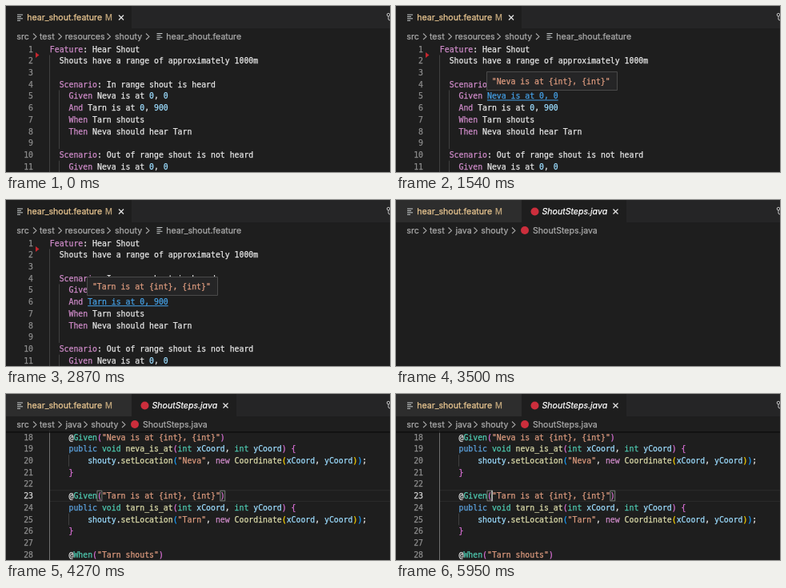
Recreate the animation shown at these times as an HTML page with a canvas. Size 480 px wide and 208 px high, loop 6020 ms.

```html
<!DOCTYPE html>
<html lang="en">
<head>
<meta charset="utf-8">
<title>Step definition lookup</title>
<style>
html, body { margin: 0; width: 100%; height: 100%; overflow: hidden; background: #1e1e1e; }
canvas { display: block; width: 480px; height: 208px; }
</style>
</head>
<body>
<canvas></canvas>
<script>
const canvas = document.querySelector('canvas');
const ctx = canvas.getContext('2d');
const scale = window.devicePixelRatio || 1;
canvas.width = 480 * scale;
canvas.height = 208 * scale;

const LOOP = 6020, CODE_X = 54.8, TOP = 46.7, ROW = 14.7;
const MONO = '9.83px "DejaVu Sans Mono", monospace';
const SANS = '10.6px Inter, sans-serif';
const BG = '#1e1e1e', TEXT = '#e8e8e8', MUTED = '#a9a9a9', GOLD = '#e8c590', GUTTER = '#8c8c8c';
const PINK = '#cf8bc9', BLUE = '#5ca2de', SKY = '#9cdcfe', TEAL = '#4ec9b0',
  SAND = '#dcdcaa', CLAY = '#dc9a7e', LINK = '#45a0e6', RED = '#cc2e3c';
const BRACKETS = ['#ffd700', '#da70d6', '#179fff'];

const feature = `Feature: Hear Shout
  Shouts have a range of approximately 1000m

  Scenario: In range shout is heard
    Given Neva is at 0, 0
    And Tarn is at 0, 900
    When Tarn shouts
    Then Neva should hear Tarn

  Scenario: Out of range shout is not heard
    Given Neva is at 0, 0`.split('\n');

const step = (name) => `    @Given("${name} is at {int}, {int}")
    public void ${name.toLowerCase()}_is_at(int xCoord, int yCoord) {
        shouty.setLocation("${name}", new Coordinate(xCoord, yCoord));
    }
`;
const java = `${step('Neva')}\n${step('Tarn')}\n    @When("Tarn shouts")`.split('\n');

// Each capture group takes the colour at the same position; brackets go by depth.
const featureRules = {
  pattern: /\b(Feature|Scenario|Given|And|When|Then)\b|\b(\d+)\b/g,
  colors: [PINK, SKY]
};
const javaRules = {
  pattern: /(".*?")|((?<=@)\w+|\b(?:void|int)\b)|(\bpublic\b)|(\bnew\b)|(\w+(?=\())|(\b(?:xCoord|yCoord|shouty)\b)|[(){}]/g,
  colors: [CLAY, TEAL, BLUE, PINK, SAND, SKY]
};

const givenLink = { row: 4, col: 10, text: 'Neva is at 0, 0', tip: '"Neva is at {int}, {int}"', y: 82.5 };
const andLink = { row: 5, col: 8, text: 'Tarn is at 0, 900', tip: '"Tarn is at {int}, {int}"', y: 96.5 };
const hovers = [
  { from: 490, to: 1190, link: andLink },
  { from: 1190, to: 1890, link: givenLink, tip: 1400 },
  { from: 1890, to: 3290, link: andLink, tip: 2310 }
];
const OPEN = 3290, LOADED = 3710;

ctx.font = MONO;
const CHAR = ctx.measureText('0').width;
const colX = (col) => CODE_X + col * CHAR;
const rowY = (row) => TOP + row * ROW;

function rect(x, y, w, h, color) {
  ctx.fillStyle = color;
  ctx.fillRect(x, y, w, h);
}

function frame(x, y, w, h, color) {
  ctx.strokeStyle = color;
  ctx.lineWidth = 1;
  ctx.strokeRect(x, y, w, h);
}

// The thin outline gives the glyphs a slightly heavier weight.
function label(text, x, y, color, font = SANS) {
  ctx.font = font;
  ctx.fillStyle = ctx.strokeStyle = color;
  ctx.lineWidth = 0.25;
  ctx.lineJoin = 'round';
  ctx.fillText(text, x, y);
  ctx.strokeText(text, x, y);
}

function stroke(points, color, width = 1) {
  ctx.strokeStyle = color;
  ctx.lineWidth = width;
  ctx.beginPath();
  points.forEach(([x, y]) => ctx.lineTo(x, y));
  ctx.stroke();
}

function dot(x, y, r, color) {
  ctx.fillStyle = color;
  ctx.beginPath();
  ctx.arc(x, y, r, 0, 2 * Math.PI);
  ctx.fill();
}

function fileIcon(x, y) {
  [7, 5, 7, 4].forEach((w, i) => rect(x, y - 4 + i * 2.4, w, 1, '#c8cccd'));
}

function closeIcon(x, y) {
  stroke([[x - 3, y - 3], [x + 3, y + 3]], '#e4e4e4', 1.2);
  stroke([[x + 3, y - 3], [x - 3, y + 3]], '#e4e4e4', 1.2);
}

function crumbs(items) {
  items.forEach(([text, x, chevron]) => {
    label(text, x, 41.6, MUTED);
    if (chevron) stroke([[chevron - 2, 34.5], [chevron + 2, 38.3], [chevron - 2, 42]], MUTED, 1.1);
  });
}

function header(javaOpen) {
  rect(0, 0, 480, 28, '#252526');
  rect(0, 0, 157, 28, javaOpen ? '#2d2d2d' : BG);
  fileIcon(14, 14.5);
  label('hear_shout.feature', 26.2, 18.2, GOLD);
  label('M', 124, 18.2, '#c4a87d', '9.8px Inter, sans-serif');
  if (javaOpen) {
    rect(157, 0, 131, 28, BG);
    dot(173.5, 14.5, 5, RED);
    label('ShoutSteps.java', 182.5, 18.2, '#ffffff', 'italic ' + SANS);
    closeIcon(274.5, 14.5);
    crumbs([['src', 13.3, 36], ['test', 42, 67.5], ['java', 74.5, 99.5], ['shouty', 106.3, 147], ['ShoutSteps.java', 171]]);
    dot(161, 38, 5, RED);
  } else {
    closeIcon(144, 14.5);
    crumbs([['src', 13.3, 36], ['test', 42, 67.5], ['resources', 73.8, 128.5], ['shouty', 136, 177], ['hear_shout.feature', 200.2]]);
    fileIcon(188.5, 38);
  }
  ctx.strokeStyle = '#c5c5c5';
  ctx.lineWidth = 1;
  ctx.beginPath();
  ctx.arc(478, 11, 1.8, 0, 2 * Math.PI);
  ctx.stroke();
  stroke([[478, 13], [478, 17], [480, 18]], '#c5c5c5');
}

function code(lines, rules, first, activeRow) {
  let depth = 1;

  function tokenColor(match) {
    const group = match.slice(1).findIndex(Boolean);
    if (group >= 0) return rules.colors[group];
    const level = '({'.includes(match[0]) ? depth++ : --depth;
    return BRACKETS[level % BRACKETS.length];
  }

  lines.forEach((text, row) => {
    const y = rowY(row) + 10.9;
    const number = String(first + row);
    label(number, 34 - number.length * CHAR, y, row === activeRow ? '#d0d0d0' : GUTTER, MONO);
    let end = 0;
    for (const match of text.matchAll(rules.pattern)) {
      label(text.slice(end, match.index), colX(end), y, TEXT, MONO);
      label(match[0], colX(match.index), y, tokenColor(match), MONO);
      end = match.index + match[0].length;
    }
    label(text.slice(end), colX(end), y, TEXT, MONO);
  });
}

function guide(col, fromRow, toRow, color = '#404040') {
  rect(Math.floor(colX(col)), rowY(fromRow), 1, (toRow - fromRow) * ROW, color);
}

function hover({ link, tip }, t) {
  const x = colX(link.col), y = rowY(link.row), w = link.text.length * CHAR;
  rect(x, y, w, ROW, BG);
  label(link.text, x, y + 10.9, LINK, MONO);
  rect(x, y + 12, w, 1, LINK);
  if (!tip || t < tip) return;
  ctx.globalAlpha = Math.min(1, (t - tip + 35) / 100);
  const left = Math.round(x) - 0.5;
  rect(left, link.y, 163, 23, '#252526');
  frame(left, link.y, 163, 23, '#4a4a4a');
  label(link.tip, x + 5.8, link.y + 15, CLAY, MONO);
  ctx.globalAlpha = 1;
}

function featureView(t) {
  guide(0, 1, 11);
  guide(2, 4, 9);
  guide(2, 10, 11);
  code(feature, featureRules, 1);
  ctx.fillStyle = '#c4262e';
  ctx.beginPath();
  ctx.moveTo(37, 58);
  ctx.lineTo(41.5, 61.5);
  ctx.lineTo(37, 65);
  ctx.fill();
  const active = hovers.find(({ from, to }) => t >= from && t < to);
  if (active) hover(active, t);
}

function javaView(t) {
  const row = 5, y = rowY(row);
  rect(CODE_X, y, 425, 1, '#2c2c2c');
  rect(CODE_X, y + ROW - 1, 425, 1, '#2c2c2c');
  guide(0, 0, 11, '#707070');
  guide(4, 2, 3);
  guide(4, 7, 8);
  [java[row].indexOf('('), java[row].lastIndexOf(')')].forEach((col) => {
    rect(colX(col), y + 1, CHAR, ROW - 2, '#1b261b');
    frame(colX(col), y + 1, CHAR, ROW - 2, '#7c7c7c');
  });
  code(java, javaRules, 18, row);
  rect(0, 47, 480, 1.5, '#0e0e0e');
  if (Math.floor((t - LOADED) / 500) % 2 === 0) rect(colX(11) - 0.5, y + 0.5, 1.4, ROW - 1, '#c8c8c6');
}

function draw(now) {
  const t = now % LOOP;
  ctx.setTransform(scale, 0, 0, scale, 0, 0);
  rect(0, 0, 480, 208, BG);
  header(t >= OPEN);
  if (t < OPEN) featureView(t);
  else if (t >= LOADED) javaView(t);
  requestAnimationFrame(draw);
}
requestAnimationFrame(draw);
</script>
</body>
</html>
```
